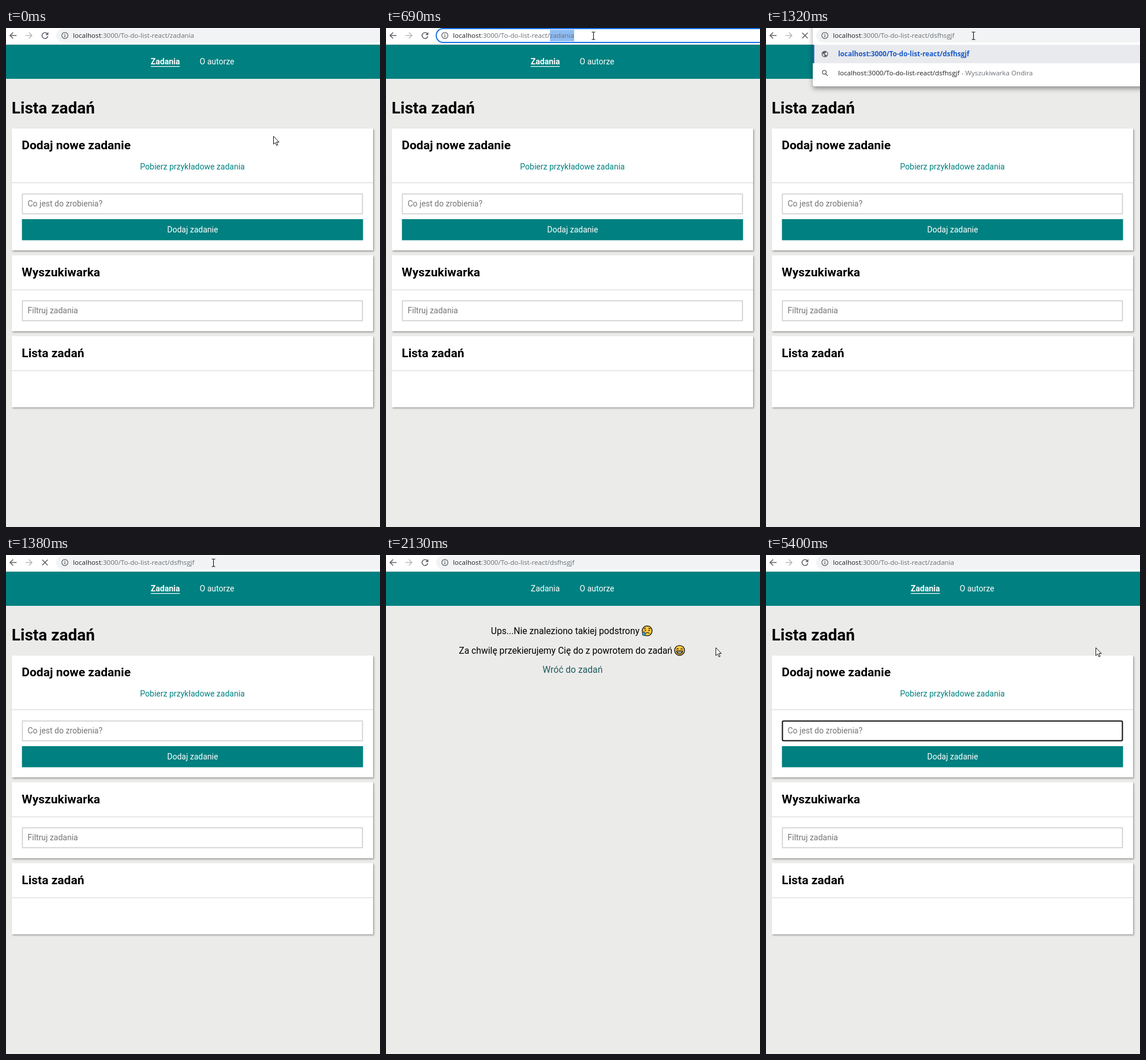
Recreate the animation shown at these times as an HTML page. Size 648 by 864 pixels, loop 5640 ms.

```html
<!DOCTYPE html>
<html lang="pl">
<head>
<meta charset="utf-8">
<title>Lista zadań</title>
<style>
  html, body { margin: 0; width: 100%; height: 100%; overflow: hidden; background: #ebebea; }
  svg { display: block; width: 648px; height: 864px; }
  text { font-family: Roboto, sans-serif; font-size: 14px; white-space: pre; }
  .mid { text-anchor: middle; }
  .h1 { font-size: 28px; font-weight: 700; }
  .h2 { font-size: 21px; font-weight: 700; }
  .big { font-size: 15.7px; }
  .hint { fill: #757575; }
  .bar text { font-family: "Open Sans", "Noto Sans", sans-serif; font-size: 11.65px; fill: #202124; }
  .bar .best { font-size: 11.75px; font-weight: 700; fill: #1a5ac8; }
  .bar .soft { fill: #6b6f74; }
  .icon { fill: none; stroke: #5f6368; stroke-width: 1.6; }
  .field { fill: #fff; stroke: #d1d1d1; stroke-width: 1.75; }
  .rule { fill: #e4e4e4; }
</style>
</head>
<body>
<svg viewBox="0 0 648 864">
  <defs>
    <filter id="cardShadow" x="-5%" y="-10%" width="110%" height="125%">
      <feDropShadow dx="1.5" dy="1.8" stdDeviation="1.5" flood-opacity=".36"/>
    </filter>
    <filter id="menuShadow" x="-10%" y="-30%" width="120%" height="170%">
      <feDropShadow dx="0" dy="4" stdDeviation="4.5" flood-opacity=".4"/>
    </filter>
    <g id="globe">
      <circle r="5.6" fill="#5f6368"/>
      <path d="M-4 -1 L-1 1.6 L-1 4.4 Q-4 3 -4 -1 M0 -4 L2.6 -3.6 L1.5 -1.4 L-.8 -.6 L.6 .8 L2.6 1.2 L3 3 Q4.8 1 4 -1.8 L3 -3.4" fill="#fff"/>
    </g>
  </defs>

  <rect width="648" height="864" fill="#ebebea"/>
  <rect y="29" width="648" height="59" fill="#008080"/>
  <text id="navTasks" class="mid" x="276" y="63" fill="#fff">Zadania</text>
  <rect id="navLine" x="251" y="66" width="50" height="1.2" fill="#fff"/>
  <text class="mid" x="365.5" y="63" fill="#fff">O autorze</text>

  <g id="tasks">
    <text class="h1" x="9.8" y="148">Lista zadań</text>
    <g fill="#fff" filter="url(#cardShadow)">
      <rect x="10" y="174" width="626" height="211"/>
      <rect x="10" y="393.5" width="626" height="131.5"/>
      <rect x="10" y="533.5" width="626" height="123"/>
    </g>
    <g class="rule">
      <rect x="10" y="267" width="626" height="1.75"/>
      <rect x="10" y="452.5" width="626" height="1.75"/>
      <rect x="10" y="592.5" width="626" height="1.75"/>
    </g>
    <text class="h2" x="27.3" y="210">Dodaj nowe zadanie</text>
    <text class="mid" x="323" y="245" fill="#008080">Pobierz przykładowe zadania</text>
    <rect class="field" x="28.4" y="287.4" width="589.2" height="34.3"/>
    <rect id="focus" x="28.5" y="287.5" width="589" height="34" rx="2" fill="#fff" stroke="#101010" stroke-width="2"/>
    <text class="hint" x="37.5" y="309">Co jest do zrobienia?</text>
    <rect id="caret" x="38" y="297" width="1" height="15"/>
    <rect x="27.6" y="331" width="591" height="36.5" fill="#008080"/>
    <text class="mid" x="323.3" y="354" fill="#fff">Dodaj zadanie</text>
    <text class="h2" x="27.3" y="430">Wyszukiwarka</text>
    <rect class="field" x="28.4" y="472.4" width="589.2" height="34.3"/>
    <text class="hint" x="37.5" y="494">Filtruj zadania</text>
    <text class="h2" x="27.3" y="570">Lista zadań</text>
  </g>

  <g id="missing">
    <text class="big" x="181.8" y="136.7">Ups...Nie znaleziono takiej podstrony</text>
    <text class="big" x="126.3" y="170.7">Za chwilę przekierujemy Cię do z powrotem do zadań</text>
    <text class="big mid" x="323.3" y="204" fill="#1f5c5c">Wróć do zadań</text>
    <g transform="translate(452.5 131.3)" fill="none" stroke="#1b1a17" stroke-width="1.4">
      <circle r="8.6" fill="#ffc83d"/>
      <path d="M-3 4.5 Q.5 1.6 4 4.5 M-5.5 -3.4 L-2.4 -5 M5.5 -3.4 L2.4 -5"/>
      <path d="M-3 -1.8 v2 M3.2 -1.8 v2" stroke-width="2"/>
      <path d="M-5.6 1 Q-9.4 5.5 -8 7.3 Q-5.6 9.4 -3.5 7.3 Q-2.4 5.4 -5.6 1Z" fill="#28afea" stroke-width=".9"/>
    </g>
    <g transform="translate(508.7 165.2)" fill="none" stroke="#1b1a17" stroke-width="1.4">
      <circle r="8.6" fill="#ffc83d"/>
      <path d="M-5.4 -1.8 Q-3.6 -4.4 -1.6 -1.8 M1.6 -1.8 Q3.6 -4.4 5.4 -1.8"/>
      <path d="M-5.3 1 H5.3 Q4.6 5.8 0 5.8 Q-4.6 5.8 -5.3 1Z" fill="#fff"/>
      <path d="M-4.8 3.2 H4.8" stroke-width="1"/>
    </g>
  </g>

  <g class="bar">
    <rect width="648" height="29" fill="#fff"/>
    <rect y="28" width="648" height="1" fill="#dcdedf"/>
    <path class="icon" d="M18.3 13 H7 M12.3 7.7 L7 13 L12.3 18.3"/>
    <path class="icon" d="M33.7 13 H45 M39.7 7.7 L45 13 L39.7 18.3" style="stroke:#b9bbbe"/>
    <g id="reload">
      <path class="icon" d="M71.8 10.3 A5.1 5.1 0 1 0 72.5 14.3"/>
      <path d="M73.4 7 V12.2 H68.2Z" fill="#5f6368"/>
    </g>
    <path id="stop" class="icon" d="M62.8 8.3 L72.2 17.7 M72.2 8.3 L62.8 17.7"/>

    <g id="menu">
      <rect id="menuBox" x="81" y="-10" width="600" rx="4" fill="#fff" filter="url(#menuShadow)"/>
      <rect x="81" y="29" width="567" height="32" fill="#e8eaed"/>
      <rect x="81" y="29" width="2.6" height="32" fill="#1a5ac8"/>
      <use href="#globe" x="102" y="45"/>
      <text id="best" class="best" x="125" y="49"></text>
      <path class="icon" style="stroke-width:1.4" d="M103.6 79.4 L107 82.8 M104.4 76.7 a3.3 3.3 0 1 1 -6.6 0 a3.3 3.3 0 1 1 6.6 0"/>
      <text x="125" y="82"><tspan id="query"></tspan><tspan class="soft"> - Wyszukiwarka Ondira</tspan></text>
      <g id="extra">
        <use href="#globe" x="102" y="111"/>
        <text x="125" y="115">localhost:3000/To-do-list-react/zadania</text>
      </g>
    </g>

    <rect id="pill" x="87" y="1" width="600" height="24" rx="12" fill="#f1f3f4"/>
    <rect id="ring" x="87" y="1" width="600" height="24" rx="12" fill="#fff" stroke="#1a73e8" stroke-width="2"/>
    <rect id="mark" y="3" height="20" fill="#8fbcf3"/>
    <g id="info">
      <circle class="icon" cx="102" cy="13" r="5.3" style="stroke-width:1.3"/>
      <path d="M101.3 12.2 h1.4 v3.8 h-1.4Z M101.3 9.8 h1.4 v1.4 h-1.4Z" fill="#5f6368"/>
    </g>
    <use id="typeIcon" href="#globe" x="102" y="13"/>
    <text x="116" y="17">localhost<tspan id="path"></tspan></text>
  </g>

  <path id="arrow" d="M.5 .5 V14.2 L3.6 11.3 L5.8 16.3 L7.9 15.4 L5.8 10.5 H10.1Z" fill="#fff" stroke="#111" stroke-width="1"/>
  <path id="beam" d="M-3 -6.5 H-1 L0 -5.7 L1 -6.5 H3 M0 -5.7 V5.7 M-3 6.5 H-1 L0 5.7 L1 6.5 H3" fill="none" stroke="#111" stroke-width="1.1"/>
</svg>
<script>
const LOOP = 5640, TICK = 30;
const BASE = ":3000/To-do-list-react/";
const WORD = "dsfhsgjf";
const START = [463, 187], BAR = [359.5, 13.5], END = [571, 160];

const el = {};
document.querySelectorAll("[id]").forEach(node => el[node.id] = node);

const show = (id, on) => el[id].style.display = on ? "" : "none";
const clamp = v => Math.max(0, Math.min(1, v));
const ease = p => p * p * (3 - 2 * p);
const mix = (a, b, p) => a.map((v, i) => v + (b[i] - v) * p);

function pointer(t) {
  if (t < 1890) return mix(START, BAR, ease(clamp((t - 150) / 390)));
  return mix(BAR, END, ease(clamp((t - 1890) / 240)));
}

function draw(now) {
  const t = Math.floor(now % LOOP / TICK) * TICK;
  const missing = t >= 1560 && t < 4680;
  const returned = t >= 4680;
  const typing = t >= 1050 && t < 1320;
  const menu = t >= 1050 && t < 1380;
  const loading = t >= 1320 && t < 1560;

  // Page
  show("tasks", !missing);
  show("missing", missing);
  show("navLine", !missing);
  el.navTasks.style.fontWeight = missing ? 400 : 700;
  show("focus", returned);
  show("caret", returned && Math.floor((t - 4680) / 240) % 2 === 0);

  // Address bar
  const typed = WORD.slice(0, Math.floor((t - 1050) / TICK) + 1);
  const last = t < 1050 || returned ? "zadania" : typed;
  el.path.textContent = BASE + last;
  el.path.style.fill = typing ? "#202124" : "#6b6f74";
  show("reload", !loading);
  show("stop", loading);
  show("pill", !typing);
  show("ring", t >= 630 && t < 1050);
  show("info", !typing);
  show("typeIcon", typing);
  show("mark", t >= 630 && t < 1050);
  const markX = t < 690 ? 116 : 284;
  el.mark.setAttribute("x", markX);
  el.mark.setAttribute("width", 326 - markX);

  // Suggestions
  const extra = t < 1110;
  show("menu", menu);
  show("extra", extra);
  el.menu.style.opacity = t >= 1350 ? 0.5 : 1;
  el.menuBox.setAttribute("height", extra ? 144 : 111);
  el.best.textContent = el.query.textContent = "localhost" + BASE + last;

  // Pointer
  const [x, y] = pointer(t);
  const inBar = y < 28;
  show("arrow", !inBar);
  show("beam", inBar);
  el[inBar ? "beam" : "arrow"].setAttribute("transform", `translate(${x} ${y})`);
}

const begin = performance.now();
function loop() {
  draw(performance.now() - begin);
  requestAnimationFrame(loop);
}
loop();
</script>
</body>
</html>
```
